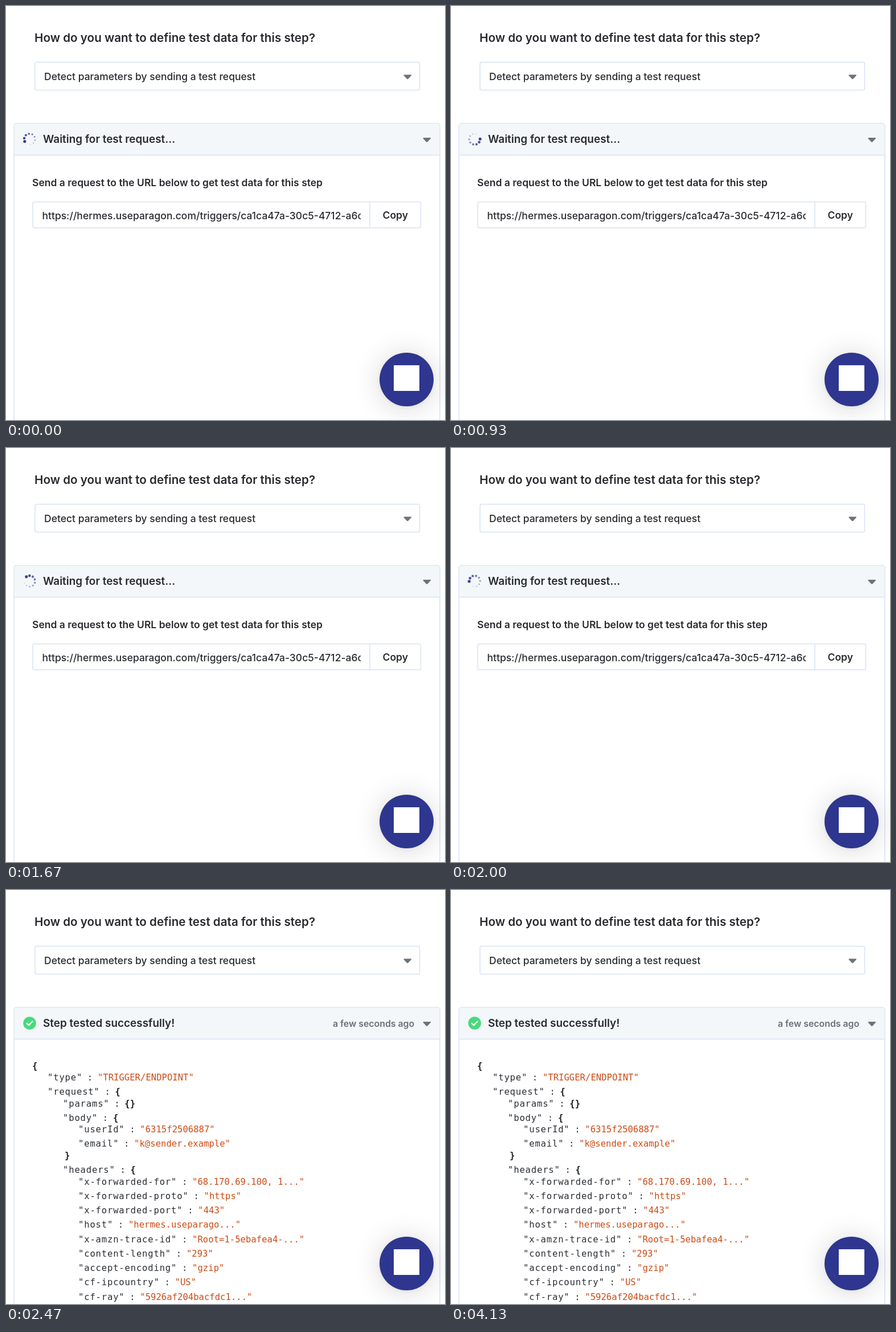
These frames come from a looping animation (771x726 px, 4270 ms). An HTML page:

```html
<!DOCTYPE html>
<html lang="en">
<head>
<meta charset="utf-8">
<title>Test request</title>
<style>
  html, body { margin: 0; width: 100%; height: 100%; overflow: hidden; background: #fff; }
  .stage { position: absolute; left: 0; top: 0; }
  text { font-family: Inter, sans-serif; font-size: 17.5px; font-weight: 500; fill: #282a2f; white-space: pre; }
  .semi { font-weight: 600; }
  .heading { font-size: 20.65px; }
  .status { font-size: 18.95px; }
  .ago { font-size: 15.85px; fill: #6a6f78; }
  .box { fill: #fff; stroke: #d9e2f5; stroke-width: 1.5; }
  .arrow { fill: #6d727b; }

  .code text { font-family: "DejaVu Sans Mono", monospace; font-size: 15.6px; font-weight: 400; fill: #2a2e34; }
  .code .key { letter-spacing: .8px; }
  .code .string { fill: #cb4b16; }
  .code .brace { font-weight: 700; fill: #1d2023; }

  .waiting { animation: waiting 4270ms step-end infinite; }
  .done { animation: done 4270ms step-end infinite; }
  .spinner { fill: #2e368f; transform-origin: 41.5px 233.5px; animation: spin 2135ms linear infinite; }
  @keyframes waiting { 0% { opacity: 1; } 57.845%, 100% { opacity: 0; } }
  @keyframes done { 0% { opacity: 0; } 57.845%, 100% { opacity: 1; } }
  @keyframes spin { to { transform: rotate(-360deg); } }

  .chat {
    position: absolute; left: 656px; top: 607.5px; width: 94.6px; height: 94.6px;
    border-radius: 50%; background: #2e368f;
    box-shadow: 0 1.5px 9px rgba(0, 0, 0, .06), 0 3px 50px rgba(0, 0, 0, .16);
  }
  .chat i { position: absolute; left: 25px; top: 22.5px; width: 45px; height: 45px; background: #fff; }
</style>
</head>
<body>
<svg class="stage" width="771" height="726" viewBox="0 0 771 726">
  <defs>
    <path id="arrow" class="arrow" d="M-6 -4H6.500q1 .6 .3 1.500l-5.700 6q-.9 .7-1.800 0l-5.700-6q-.6-.9 .4-1.500z"/>
  </defs>
  <text class="semi heading" x="50" y="63">How do you want to define test data for this step?</text>
  <rect class="box" x="51" y="98.500" width="675.500" height="49" rx="3"/>
  <text x="67" y="129.500">Detect parameters by sending a test request</text>
  <use href="#arrow" x="705" y="124.500"/>

  <rect class="box" x="14" y="206" width="748" height="540" rx="4"/>
  <path d="M14.700 261.500V210q0-3.300 3.300-3.300H758q3.300 0 3.300 3.300v51.500z" fill="#f3f7f9"/>
  <path class="box" d="M14 261.500H762"/>
  <use href="#arrow" x="739" y="235"/>

  <g class="waiting">
    <g class="spinner" id="spinner"></g>
    <text class="semi status" x="65" y="240">Waiting for test request...</text>
    <text class="semi" x="46" y="315.500">Send a request to the URL below to get test data for this step</text>
    <rect class="box" x="47" y="343.500" width="681.500" height="45.500" rx="3"/>
    <path class="box" d="M639 343.500V389"/>
    <svg width="623" height="726">
      <text x="63.500" y="374">https://hermes.useparagon.com/triggers/ca1ca47a-30c5-4712-a6c</text>
    </svg>
    <text class="semi" x="661.500" y="372.500">Copy</text>
  </g>

  <g class="done">
    <circle cx="41.500" cy="233.500" r="11.300" fill="#48da7c"/>
    <path d="M36.500 233.800l3.500 3.400 6.500-6.700" fill="none" stroke="#fff" stroke-width="2.500" stroke-linecap="round" stroke-linejoin="round"/>
    <text class="semi status" x="65" y="240">Step tested successfully!</text>
    <text class="semi ago" x="574" y="240">a few seconds ago</text>
    <g class="code" id="code"></g>
  </g>
</svg>
<div class="chat"><i></i></div>

<script>
  const NS = 'http://www.w3.org/2000/svg';
  const add = (parent, tag, attrs, content = '') => {
    const el = document.createElementNS(NS, tag);
    for (const name in attrs) el.setAttribute(name, attrs[name]);
    el.textContent = content;
    parent.append(el);
  };

  // Ring of dots shrinking clockwise from the largest one
  const spinner = document.getElementById('spinner');
  for (let i = 0; i < 9; i++) {
    const angle = (245 + i * 36) * Math.PI / 180;
    add(spinner, 'circle', {
      cx: 41.5 + 9.6 * Math.sin(angle),
      cy: 233.5 - 9.6 * Math.cos(angle),
      r: 2.5 - i * 0.22,
      opacity: 1 - i * 0.08
    });
  }

  // Depth, key, value; a row without a key is a lone brace
  const rows = [
    [0, '', '{'],
    [1, 'type', 'TRIGGER/ENDPOINT'],
    [1, 'request', '{'],
    [2, 'params', '{}'],
    [2, 'body', '{'],
    [3, 'userId', '6315f2506887'],
    [3, 'email', 'k@sender.example'],
    [2, '', '}'],
    [2, 'headers', '{'],
    [3, 'x-forwarded-for', '68.170.69.100, 1...'],
    [3, 'x-forwarded-proto', 'https'],
    [3, 'x-forwarded-port', '443'],
    [3, 'host', 'hermes.useparago...'],
    [3, 'x-amzn-trace-id', 'Root=1-5ebafea4-...'],
    [3, 'content-length', '293'],
    [3, 'accept-encoding', 'gzip'],
    [3, 'cf-ipcountry', 'US'],
    [3, 'cf-ray', '5926af204bacfdc1...']
  ];
  const code = document.getElementById('code');
  const write = (x, y, style, content) => add(code, 'text', { x, y, class: style }, content);
  const keyStep = 10.2;
  let y = 313.5;
  rows.forEach(([depth, key, value], i) => {
    if (i) y += rows[i - 1][2] === '{' || value === '}' ? 20.4 : 25.25;
    let x = 46 + depth * 27;
    if (key) {
      write(x, y, 'key', `"${key}"`);
      x += (key.length + 2) * keyStep;
      write(x + 8.6, y, 'key', ':');
      x += 26.7;
    } else if (depth) {
      x += 3;
    }
    const brace = /^[{}]+$/.test(value);
    write(x, y, brace ? 'brace' : 'string', brace ? value : `"${value}"`);
  });
</script>
</body>
</html>
```
